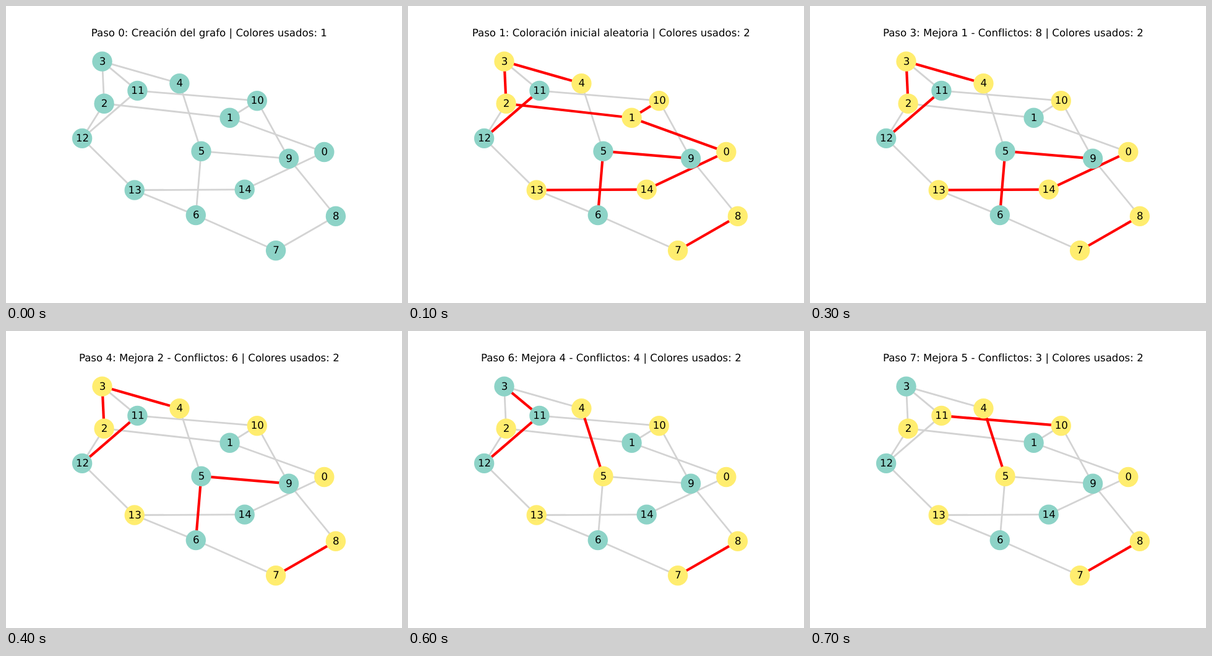
Animation, 640 px wide and 480 px high, one loop 800 ms. Source, as an HTML page:

```html
<!DOCTYPE html>
<html lang="es">
<head>
<meta charset="utf-8">
<title>Coloración de un grafo</title>
<style>
  html, body { margin: 0; width: 100%; height: 100%; overflow: hidden; background: #fff; }
  svg { display: block; width: 640px; height: 480px; }
  text {
    font: 16.64px "DejaVu Sans", sans-serif;
    text-anchor: middle;
    text-rendering: geometricPrecision;
  }
</style>
</head>
<body>
<svg id="stage" viewBox="0 0 640 480"></svg>
<script>
const STEP = 100, STEPS = 8;
const TEAL = '#8dd3c7', YELLOW = '#ffed6f';

const nodes = [
  [514.3, 236], [361.6, 180.7], [158.6, 157.7], [155.5, 89.6], [280.4, 125.2],
  [315.5, 234.7], [306.8, 338.1], [436.1, 395.2], [532.9, 339.7], [457.1, 246.7],
  [405.8, 153.2], [212.4, 136.9], [123.1, 213.9], [207.7, 297.5], [385.7, 296.6]
];

// A ring through all nodes plus a few chords
const edges = nodes.map((_, i) => [i, (i + 1) % nodes.length])
  .concat([[1, 10], [2, 12], [3, 11], [5, 9], [6, 13]]);

const startTeal = [5, 6, 9, 11, 12];

const stage = document.getElementById('stage');

function add(tag, attrs, text = '') {
  const el = document.createElementNS('http://www.w3.org/2000/svg', tag);
  for (const key in attrs) el.setAttribute(key, attrs[key]);
  el.textContent = text;
  return stage.appendChild(el);
}

function addLine([a, b], stroke, width) {
  const [x1, y1] = nodes[a], [x2, y2] = nodes[b];
  return add('line', { x1, y1, x2, y2, stroke, 'stroke-width': width });
}

edges.forEach(e => addLine(e, '#d3d3d3', 2.78));
const clashLines = edges.map(e => addLine(e, '#f00', 4.17));
const discs = nodes.map(([cx, cy]) => add('circle', { cx, cy, r: 16.2 }));
nodes.forEach(([x, y], i) => add('text', { x: x + 0.5, y: Math.floor(y + 5.75) }, i));
const title = add('text', { x: 328.3, y: 49 });

// How many clashes disappear when node i changes colour
function gain(colors, i) {
  return edges.filter(e => e.includes(i))
    .reduce((sum, [a, b]) => sum + (colors[a] === colors[b] ? 1 : -1), 0);
}

// Greedy improvement: recolour the node with the largest gain
function improve(colors) {
  const gains = colors.map((_, i) => gain(colors, i));
  const best = gains.indexOf(Math.max(...gains));
  return colors.map((c, i) => i !== best ? c : c === TEAL ? YELLOW : TEAL);
}

function colorsAt(step) {
  if (step === 0) return nodes.map(() => TEAL);
  let colors = nodes.map((_, i) => startTeal.includes(i) ? TEAL : YELLOW);
  for (let n = 2; n < step; n++) colors = improve(colors);
  return colors;
}

function caption(step, clashes) {
  if (step === 0) return 'Creación del grafo';
  if (step === 1) return 'Coloración inicial aleatoria';
  return `Mejora ${step - 2} - Conflictos: ${clashes}`;
}

function draw(step) {
  const colors = colorsAt(step);
  const clash = edges.map(([a, b]) => step > 0 && colors[a] === colors[b]);
  const used = new Set(colors).size;
  discs.forEach((d, i) => d.setAttribute('fill', colors[i]));
  clashLines.forEach((l, i) => l.setAttribute('visibility', clash[i] ? 'visible' : 'hidden'));
  title.textContent =
    `Paso ${step}: ${caption(step, clash.filter(Boolean).length)} | Colores usados: ${used}`;
}

const start = performance.now();
let shown = 0;

function tick() {
  const step = Math.floor((performance.now() - start) / STEP) % STEPS;
  if (step !== shown) draw(shown = step);
  requestAnimationFrame(tick);
}

draw(0);
requestAnimationFrame(tick);
</script>
</body>
</html>
```
